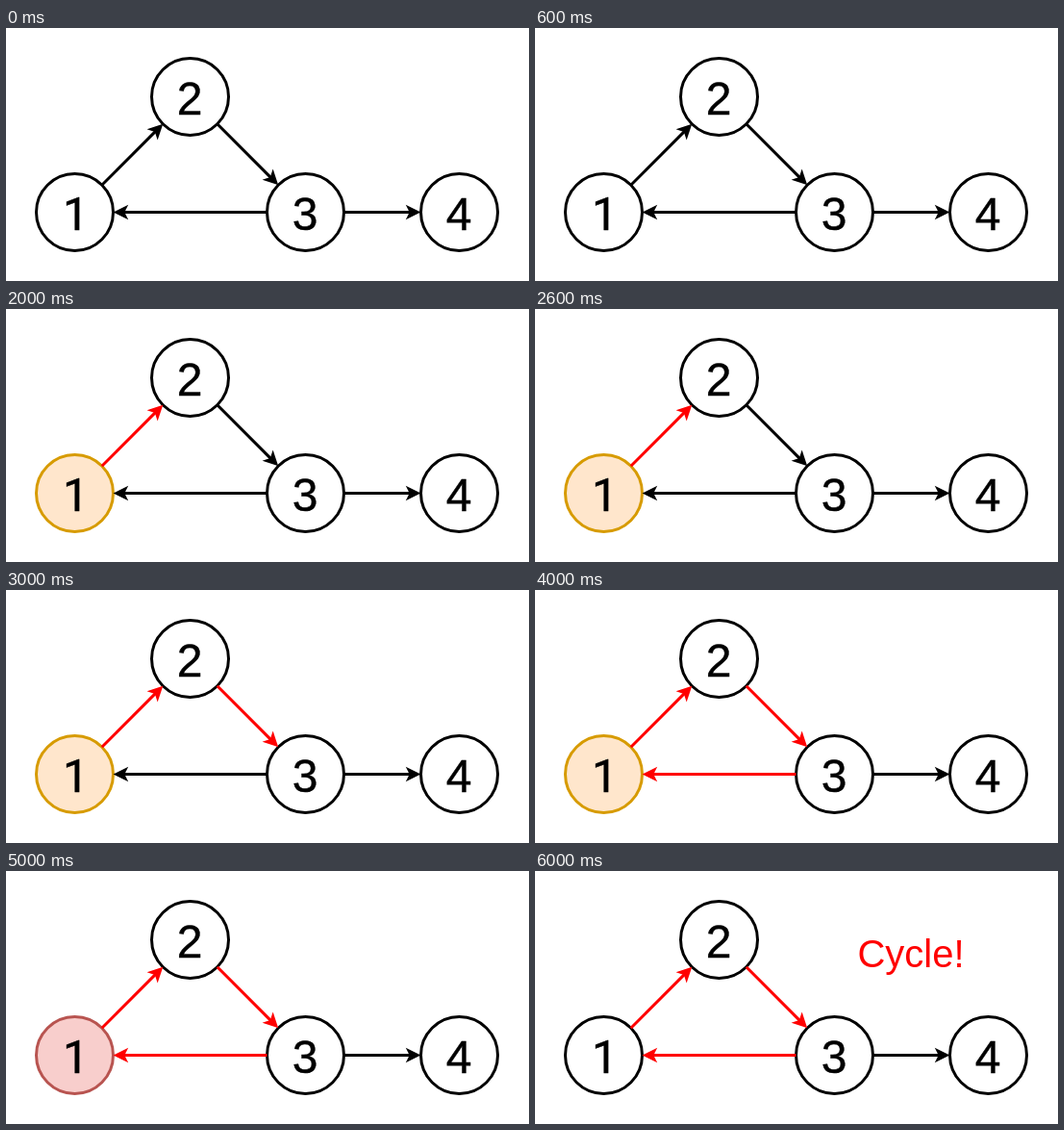
These frames come from a looping animation (544 px wide and 263 px high, 7000 ms). An HTML page with a canvas:

```html
<!DOCTYPE html>
<html lang="en">
<head>
<meta charset="utf-8">
<title>Cycle detection</title>
<style>
html, body { margin: 0; width: 100%; height: 100%; overflow: hidden; background: #fff; }
canvas { display: block; }
</style>
</head>
<body>
<canvas id="stage" width="544" height="263"></canvas>
<script>
const ctx = document.getElementById('stage').getContext('2d');
const RADIUS = 40, HEAD = 9, WIDTH = 3;
const SANS = '"Liberation Sans", Arial, sans-serif';
const nodes = { 1: [71.5, 191.5], 2: [191.5, 71.5], 3: [311.5, 191.5], 4: [471.5, 191.5] };
// from, to, second at which the edge is traversed
const edges = [[1, 2, 2], [2, 3, 3], [3, 1, 4], [3, 4, Infinity]];
const plain = ['#fff', '#000'], visiting = ['#ffe6cc', '#d79b00'], revisited = ['#f8cecc', '#b85450'];

function drawNode(id, [fill, stroke]) {
  const [x, y] = nodes[id];
  ctx.beginPath();
  ctx.arc(x, y, RADIUS, 0, Math.PI * 2);
  ctx.fillStyle = fill;
  ctx.strokeStyle = stroke;
  ctx.fill();
  ctx.stroke();
  // Roboto has a "1" without a foot
  const footless = id === '1';
  ctx.font = '48px ' + (footless ? 'Roboto, sans-serif' : SANS);
  ctx.fillStyle = ctx.strokeStyle = '#000';
  const textX = x + (footless ? 1 : -0.5);
  ctx.fillText(id, textX, y + 18.5);
  ctx.lineWidth = 0.4;
  ctx.strokeText(id, textX, y + 18.5);
  ctx.lineWidth = WIDTH;
}

function drawEdge(from, to, color) {
  const [x1, y1] = nodes[from], [x2, y2] = nodes[to];
  const end = Math.hypot(x2 - x1, y2 - y1) - RADIUS;
  const tip = end - WIDTH * 1.118;
  ctx.save();
  ctx.translate(x1, y1);
  ctx.rotate(Math.atan2(y2 - y1, x2 - x1));
  ctx.fillStyle = ctx.strokeStyle = color;
  ctx.beginPath();
  ctx.moveTo(RADIUS, 0);
  ctx.lineTo(tip - HEAD * 0.75, 0);
  ctx.stroke();
  ctx.beginPath();
  ctx.moveTo(tip, 0);
  ctx.lineTo(tip - HEAD, HEAD / 2);
  ctx.lineTo(tip - HEAD * 0.75, 0);
  ctx.lineTo(tip - HEAD, -HEAD / 2);
  ctx.closePath();
  ctx.fill();
  ctx.stroke();
  ctx.restore();
}

function draw(now) {
  const step = Math.floor(now / 1000) % 7;
  const startStyle = step === 0 || step === 6 ? plain : step === 5 ? revisited : visiting;
  ctx.fillStyle = '#fff';
  ctx.fillRect(0, 0, 544, 263);
  ctx.lineWidth = WIDTH;
  ctx.textAlign = 'center';
  for (const id in nodes) drawNode(id, id === '1' ? startStyle : plain);
  for (const [from, to, at] of edges) drawEdge(from, to, step >= at ? '#f00' : '#000');
  if (step === 6) {
    ctx.font = '40px ' + SANS;
    ctx.fillStyle = '#f00';
    ctx.fillText('Cycle!', 391, 99.5);
  }
  requestAnimationFrame(draw);
}
requestAnimationFrame(draw);
</script>
</body>
</html>
```
